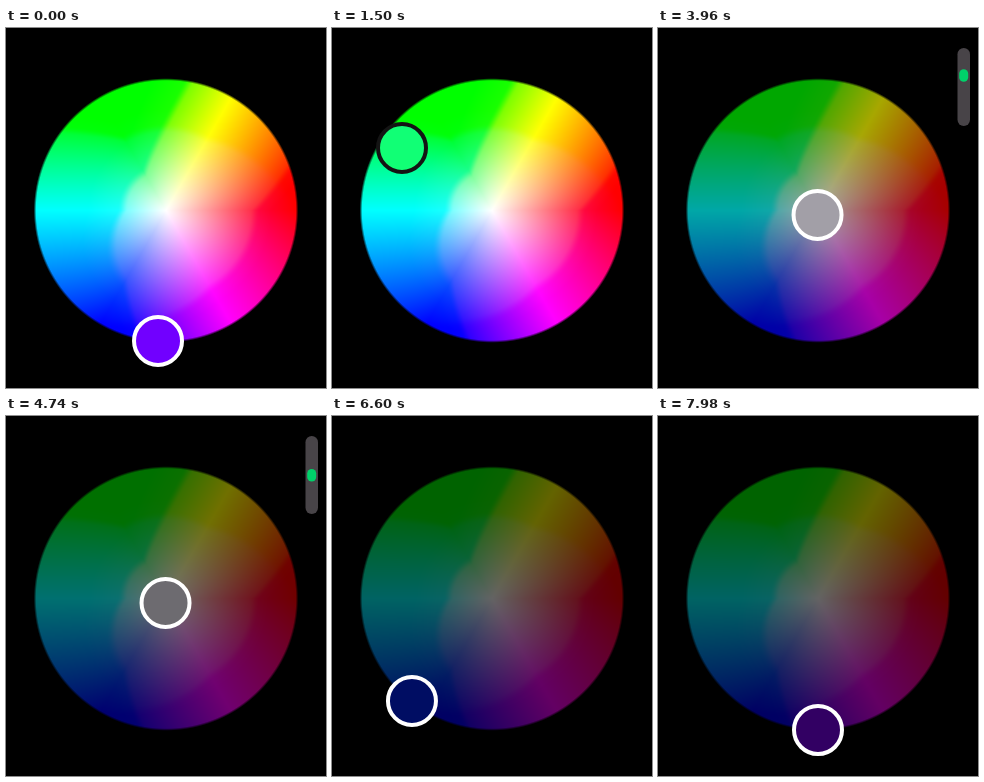
Animation of 320 by 360 pixels, one loop 8 s. Source, as an HTML page with a canvas:

```html
<!DOCTYPE html>
<html lang="en">
<head>
<meta charset="utf-8">
<title>Colour wheel</title>
<style>
  html, body { margin: 0; width: 100%; height: 100%; overflow: hidden; background: #000; }
  canvas { display: block; width: 320px; height: 360px; }
</style>
</head>
<body>
<canvas id="stage" width="320" height="360"></canvas>
<script>
const W = 320, H = 360, LOOP = 8000, STEP = 60;
const CX = 160, CY = 182.5, R = 131;
const SLIDER_ON = 2700, SLIDER_OFF = 5220;
const ctx = document.getElementById('stage').getContext('2d');

// Marker sweeps around the wheel, in degrees and pixels from its centre
const SWEEP = [
  { t: 0, angle: 266.5, radius: 130.7 },
  { t: 1500, angle: 145.2, radius: 109.6 },
  { t: 2520, angle: -96, radius: 4.5 },
  { t: 5250, angle: -96, radius: 4.5 },
  { t: 5920, angle: -88, radius: 126 },
  { t: 6600, angle: -128, radius: 130 },
  { t: 7200, angle: -260, radius: 104 },
  { t: 7980, angle: -450, radius: 131.5 }
];

const clamp = (v, lo = 0, hi = 1) => Math.min(hi, Math.max(lo, v));
const mix = (a, b, k) => a + (b - a) * k;
const smooth = (a, b, v) => {
  const k = clamp((v - a) / (b - a));
  return k * k * (3 - 2 * k);
};

// Cubic interpolation that does not overshoot its keys
function sample(keys, t, prop) {
  const last = keys.length - 1;
  if (t >= keys[last].t) return keys[last][prop];
  const i = keys.findIndex(k => k.t > t) - 1;
  const slope = j => (keys[j + 1][prop] - keys[j][prop]) / (keys[j + 1].t - keys[j].t);
  const tangent = j => {
    if (j === 0) return slope(0);
    if (j === last) return slope(last - 1);
    const a = slope(j - 1), b = slope(j);
    return a * b <= 0 ? 0 : 2 * a * b / (a + b);
  };
  const h = keys[i + 1].t - keys[i].t, u = (t - keys[i].t) / h;
  const u2 = u * u, u3 = u2 * u, s = 3 * u2 - 2 * u3;
  return mix(keys[i][prop], keys[i + 1][prop], s)
    + h * ((u3 - 2 * u2 + u) * tangent(i) + (u3 - u2) * tangent(i + 1));
}

function markerAt(t) {
  const a = sample(SWEEP, t, 'angle') * Math.PI / 180;
  const r = sample(SWEEP, t, 'radius');
  return [CX + r * Math.cos(a), CY - r * Math.sin(a)];
}

function colorAt(x, y, curve = 1) {
  const dx = x - CX, dy = CY - y;
  const sat = 1 - (1 - clamp(Math.hypot(dx, dy) / R)) ** curve;
  const hue = (Math.atan2(dy, dx) * 3 / Math.PI + 6) % 6;
  return [5, 3, 1].map(n => {
    const k = (n + hue) % 6;
    return 1 - sat * clamp(Math.min(k, 4 - k));
  });
}

// Weak channels fall off below a cut, which gives the wheel its facets
function weaken(v, cut) {
  const base = 0.6 * cut;
  const rise = Math.max(0, (v - base) / (1 - base));
  return rise * mix(0.25, 1, smooth(cut - 0.05, cut + 0.03, v));
}

function facet([r, g, b]) {
  return [weaken(r, 0.33 + 0.35 * g * g), weaken(g, 0.33 * r), weaken(b, 0.38 * g)];
}

function makeWheel() {
  const c = document.createElement('canvas');
  c.width = W;
  c.height = H;
  const g = c.getContext('2d'), img = g.createImageData(W, H);
  for (let y = 0; y < H; y++) {
    for (let x = 0; x < W; x++) {
      const px = x + 0.5, py = y + 0.5;
      const cover = clamp((R - Math.hypot(px - CX, py - CY)) / 2.5 + 0.5);
      if (!cover) continue;
      const i = (y * W + x) * 4;
      facet(colorAt(px, py)).forEach((v, n) => { img.data[i + n] = v * 255; });
      img.data[i + 3] = cover * 255;
    }
  }
  g.putImageData(img, 0, 0);
  return c;
}
const wheel = makeWheel();

function pill(x, y, w, h, fill) {
  ctx.beginPath();
  ctx.roundRect(x, y, w, h, w / 2);
  ctx.fillStyle = fill;
  ctx.fill();
}

function drawMarker(x, y, value) {
  const rgb = colorAt(x, y, 1.5).map(v => v * value);
  const lin = rgb.map(v => v ** 2.2);
  const lum = 0.2126 * lin[0] + 0.7152 * lin[1] + 0.0722 * lin[2];
  ctx.beginPath();
  ctx.arc(x, y, 24, 0, Math.PI * 2);
  ctx.fillStyle = `rgb(${rgb.map(v => Math.round(v * 255)).join(',')})`;
  ctx.fill();
  ctx.lineWidth = 4;
  ctx.strokeStyle = lum > 0.5 ? '#141414' : '#fff';
  ctx.stroke();
}

function draw(t) {
  const drag = 1 - (1 - clamp((t - 3000) / 2040)) ** 1.3;
  const knob = 29 + 33 * drag, value = 1 - 0.61 * drag;
  ctx.fillStyle = '#000';
  ctx.fillRect(0, 0, W, H);
  ctx.globalAlpha = value;
  ctx.drawImage(wheel, 0, 0);
  ctx.globalAlpha = 1;
  drawMarker(...markerAt(t), value);
  if (t >= SLIDER_ON && t < SLIDER_OFF) {
    pill(299.5, 20, 12.5, 78, '#484448');
    pill(301.2, knob - 6.3, 9, 12.6, '#00d26a');
  }
}

const start = performance.now();
function tick() {
  const t = (performance.now() - start) % LOOP;
  draw(Math.floor(t / STEP) * STEP);
  requestAnimationFrame(tick);
}
tick();
</script>
</body>
</html>
```
